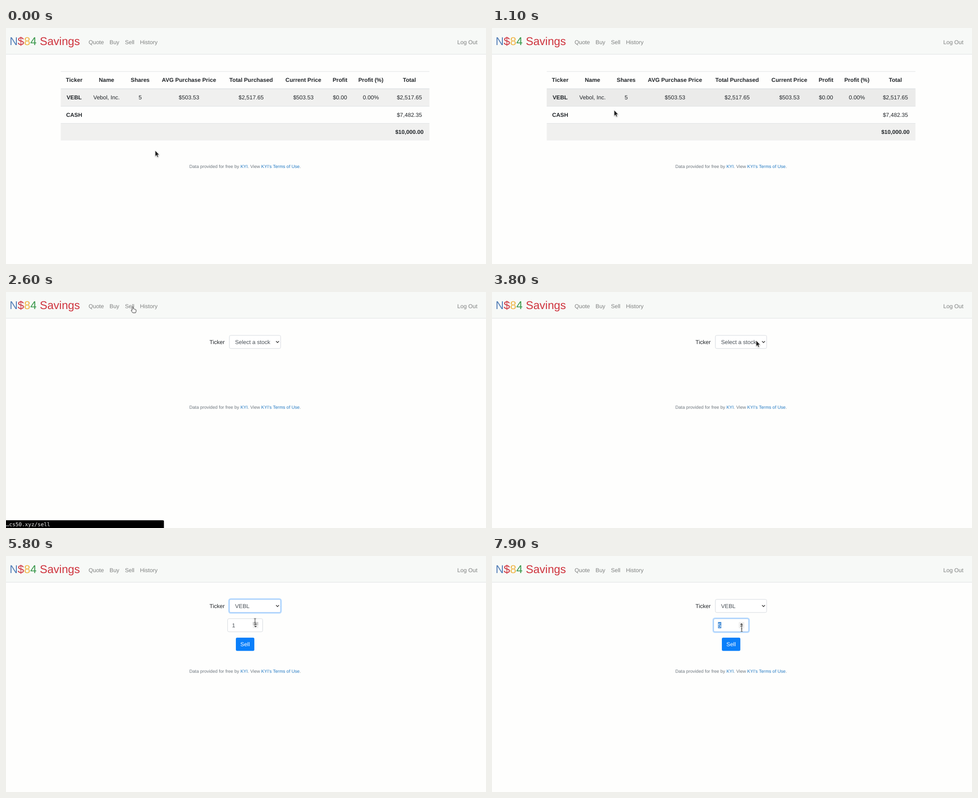
Write an HTML page that moves like this. It is 1065x526 px and loops after 8 s.

```html
<!DOCTYPE html>
<html lang="en">
<head>
<meta charset="utf-8">
<title>Portfolio</title>
<style>
html, body { margin: 0; width: 100%; height: 100%; overflow: hidden; background: #fefefd; }
svg { display: block; }
#stage { width: 1065px; height: 526px; }
text { font: 12.54px "Liberation Sans", Arial, sans-serif; fill: #212529; text-rendering: geometricPrecision; white-space: pre; }
.mid { text-anchor: middle; }
.bold, .bold text { font-weight: bold; }
.brand { font-size: 25.07px; fill: #cf343e; }
.nav text { fill: #7f8180; }
.foot { font-size: 10.05px; fill: #6c757d; }
.link { fill: #1f77c2; }
.field { fill: #fff; stroke: #ced4da; stroke-width: .9; }
.glow { fill: none; stroke: #bfdeff; stroke-width: 2.4; }
.edge { fill: none; stroke: #80bdff; stroke-width: .9; }
.value text, text.value { fill: #495057; }
.white { fill: #fff; }

/* Everything shares one 8 s clock with hard cuts. */
.a { animation: 8s step-end -10ms infinite; }
.home { animation-name: home; }
.form { animation-name: form; }
.row3 { animation-name: row3; }
.row2 { animation-name: row2; }
.row1 { animation-name: row1; }
.nav .sell { animation-name: sell; }
.status { animation-name: status; }
.foot { animation-name: foot; }
.before { animation-name: before; }
.order { animation-name: order; }
.popup { animation-name: popup; filter: drop-shadow(0 2px 3px rgba(0,0,0,.3)); }
.mark { animation-name: mark; }
.popup .opt1 { animation-name: opt1; }
.popup .opt2 { animation-name: opt2; }
.focus1 { animation-name: focus1; }
.focus2 { animation-name: focus2; }
.spin { animation-name: spin; }
.press { animation-name: press; }
.digits { animation-name: digits; }
.cursor { animation-name: move; }
.arrow { animation-name: arrow; }
.hand { animation-name: hand; }
.beam { animation-name: beam; }

@keyframes home { 0% { opacity: 1 } 32.5%, 100% { opacity: 0 } }
@keyframes form { 0% { opacity: 0 } 32.5%, 100% { opacity: 1 } }
@keyframes row3 { 0% { opacity: 0 } 11.25% { opacity: 1 } 12.5%, 100% { opacity: 0 } }
@keyframes row2 { 0% { opacity: 0 } 12.5% { opacity: 1 } 13.75%, 100% { opacity: 0 } }
@keyframes row1 { 0% { opacity: 0 } 13.75% { opacity: 1 } 15%, 100% { opacity: 0 } }
@keyframes sell { 0% { fill: #7f8180 } 20% { fill: #4b4c4b } 32.5%, 100% { fill: #7f8180 } }
@keyframes status { 0% { opacity: 0 } 21.25% { opacity: .6 } 23.75% { opacity: 1 } 35%, 100% { opacity: 0 } }
@keyframes foot { 0% { transform: none } 32.5%, 100% { transform: translateY(-51.8px) } }
@keyframes before { 0% { opacity: 1 } 66.25%, 100% { opacity: 0 } }
@keyframes order { 0% { opacity: 0 } 66.25%, 100% { opacity: 1 } }
@keyframes popup { 0% { opacity: 0 } 50% { opacity: 1 } 66.25%, 100% { opacity: 0 } }
@keyframes mark { 0% { transform: translateY(-15.7px) } 56.25%, 100% { transform: none } }
@keyframes opt1 { 0% { fill: #fff } 56.25%, 100% { fill: #495057 } }
@keyframes opt2 { 0% { fill: #495057 } 56.25%, 100% { fill: #fff } }
@keyframes focus1 { 0% { opacity: 0 } 48.75% { opacity: 1 } 75%, 100% { opacity: 0 } }
@keyframes focus2 { 0% { opacity: 0 } 75%, 100% { opacity: 1 } }
@keyframes spin { 0% { opacity: 0 } 72.5%, 100% { opacity: 1 } }
@keyframes press { 0% { opacity: 0 } 72.5% { opacity: 1 } 91.25%, 100% { opacity: 0 } }
@keyframes digits {
  0% { transform: none; fill: #495057 }
  75% { transform: translateY(-20px); fill: #fff }
  78.75% { transform: translateY(-40px); fill: #fff }
  85% { transform: translateY(-60px); fill: #fff }
  87.5%, 100% { transform: translateY(-80px); fill: #fff }
}
.digits text { fill: inherit; }
@keyframes arrow { 0% { opacity: 1 } 20% { opacity: 0 } 33.75% { opacity: 1 } 66.25%, 100% { opacity: 0 } }
@keyframes hand { 0% { opacity: 0 } 20% { opacity: 1 } 33.75%, 100% { opacity: 0 } }
@keyframes beam { 0% { opacity: 0 } 66.25%, 100% { opacity: 1 } }
@keyframes move {
  0% { transform: translate(331px, 273px) }
  10% { transform: translate(329px, 268px) }
  11.25% { transform: translate(316px, 245px) }
  12.5% { transform: translate(292px, 213px) }
  13.75% { transform: translate(271px, 183px) }
  15% { transform: translate(261px, 150px) }
  16.25% { transform: translate(262px, 115px) }
  17.5% { transform: translate(268px, 80px) }
  18.75% { transform: translate(275px, 50px) }
  20% { transform: translate(279px, 33px) }
  26.25% { transform: translate(281px, 33px) }
  33.75% { transform: translate(288px, 38px) }
  35% { transform: translate(310px, 47px) }
  36.25% { transform: translate(350px, 60px) }
  37.5% { transform: translate(400px, 76px) }
  38.75% { transform: translate(450px, 90px) }
  40% { transform: translate(495px, 101px) }
  41.25% { transform: translate(528px, 107px) }
  42.5% { transform: translate(552px, 110px) }
  43.75% { transform: translate(569px, 110px) }
  45% { transform: translate(579px, 109px) }
  46.25% { transform: translate(584px, 108px) }
  47.5% { transform: translate(586px, 108px) }
  53.75% { transform: translate(584px, 112px) }
  55% { transform: translate(580px, 121px) }
  56.25% { transform: translate(574px, 131px) }
  57.5% { transform: translate(567px, 139px) }
  58.75% { transform: translate(560px, 144px) }
  60% { transform: translate(555px, 146px) }
  61.25% { transform: translate(552.5px, 146.5px) }
  91.25% { transform: translate(534px, 145px) }
  92.5% { transform: translate(516px, 144px) }
  95% { transform: translate(511px, 149px) }
  96.25% { transform: translate(519px, 160px) }
  97.5% { transform: translate(538px, 164px) }
  98.75%, 100% { transform: translate(554px, 161px) }
}
</style>
</head>
<body>
<svg id="stage" viewBox="0 0 1065 526">
  <rect width="1065" height="526" fill="#fefefd"/>

  <g class="nav">
    <rect width="1065" height="58" fill="#f7f9f7"/>
    <rect y="58" width="1065" height="1" fill="#dfe2e3"/>
    <text class="brand" x="8" y="38.2" style="fill:#cf343e"><tspan fill="#5580b8">N</tspan>$<tspan fill="#efb546">8</tspan><tspan fill="#38974a">4</tspan> Savings</text>
    <text x="183.2" y="36">Quote</text>
    <text x="229.8" y="36">Buy</text>
    <text class="a sell" x="264" y="36">Sell</text>
    <text x="297.2" y="36">History</text>
    <text x="1001.3" y="36">Log Out</text>
  </g>

  <g class="a home">
    <g fill="#f0f0ef">
      <rect x="121.5" y="136" width="818" height="38.5"/>
      <rect x="121.5" y="212.5" width="818" height="38.2"/>
    </g>
    <g fill="#ebebea">
      <rect class="a row1" x="121.5" y="136" width="818" height="38.5"/>
      <rect class="a row2" x="121.5" y="174.5" width="818" height="38"/>
      <rect class="a row3" x="121.5" y="212.5" width="818" height="38.2"/>
    </g>
    <g fill="#dee1e3">
      <rect x="121.5" y="96.4" width="818" height="1"/>
      <rect x="121.5" y="134.7" width="818" height="1.6"/>
      <rect x="121.5" y="174" width="818" height="1"/>
      <rect x="121.5" y="212.2" width="818" height="1"/>
    </g>
    <text class="mid bold" y="120"><tspan x="151.2">Ticker</tspan><tspan x="223">Name</tspan><tspan x="297.7">Shares</tspan><tspan x="406">AVG Purchase Price</tspan><tspan x="543.8">Total Purchased</tspan><tspan x="659.8">Current Price</tspan><tspan x="741">Profit</tspan><tspan x="809.6">Profit (%)</tspan><tspan x="895">Total</tspan></text>
    <text class="mid" y="159.2"><tspan class="bold" x="151.2">VEBL</tspan><tspan x="223">Vebol, Inc.</tspan><tspan x="297.7">5</tspan><tspan x="406">$503.53</tspan><tspan x="543.8">$2,517.65</tspan><tspan x="659.8">$503.53</tspan><tspan x="741">$0.00</tspan><tspan x="809.6">0.00%</tspan><tspan x="895">$2,517.65</tspan></text>
    <text class="mid" y="197.6"><tspan class="bold" x="151.2">CASH</tspan><tspan x="895">$7,482.35</tspan></text>
    <text class="mid bold" x="895" y="236">$10,000.00</text>
  </g>

  <text class="a foot mid" x="530.5" y="312.4">Data provided for free by <tspan class="link">KYI</tspan>. View <tspan class="link">KYI’s Terms of Use</tspan>.</text>

  <g class="a form">
    <text x="451.6" y="115.6">Ticker</text>
    <rect class="field" x="495.6" y="96.7" width="113.8" height="29.2" rx="3"/>
    <g class="a focus1">
      <rect class="glow" x="494.3" y="95.4" width="116.4" height="31.8" rx="4"/>
      <rect class="edge" x="495.6" y="96.7" width="113.8" height="29.2" rx="3"/>
    </g>
    <text class="value" x="508.2" y="115.6"><tspan class="a before">Select a stock</tspan></text>
    <path d="M599.2 109.6l3.2 3.3 3.2-3.3" fill="none" stroke="#333" stroke-width="1.5"/>
  </g>

  <!-- The chosen ticker covers the placeholder. -->
  <g class="a order">
    <rect x="507" y="102" width="82" height="18" fill="#fff"/>
    <text class="value" x="508.2" y="115.6">VEBL</text>

    <rect class="field" x="491.7" y="139.7" width="77.8" height="29.2" rx="3"/>
    <g class="a focus2">
      <rect class="glow" x="490.4" y="138.4" width="80.4" height="31.8" rx="4"/>
      <rect class="edge" x="491.7" y="139.7" width="77.8" height="29.2" rx="3"/>
      <rect x="501.5" y="147.2" width="7.2" height="13.8" fill="#3c87d4"/>
    </g>
    <svg x="501.5" y="147" width="10" height="15" overflow="hidden">
      <g class="a digits">
        <text y="11.5">1</text>
        <text y="31.5">2</text>
        <text y="51.5">3</text>
        <text y="71.5">4</text>
        <text y="91.5">5</text>
      </g>
    </svg>
    <g class="a spin">
      <rect x="547.5" y="147.2" width="12.3" height="13.6" fill="#efefef"/>
      <rect class="a press" x="547.5" y="147.2" width="12.3" height="6.8" fill="#cfcfcf"/>
      <path d="M550.6 152.7l3-2.8 3 2.8zM550.6 156l3 2.8 3-2.8z" fill="#333"/>
    </g>

    <rect x="510" y="182" width="41" height="29.6" rx="3" fill="#0a7ffa"/>
    <text class="mid white" style="fill:#fff" x="530.5" y="201.2">Sell</text>
  </g>

  <g class="a popup">
    <rect x="495.6" y="126.5" width="113.4" height="32.8" fill="#fff" stroke="#555b60" stroke-width="1"/>
    <rect class="a mark" x="496.1" y="142.8" width="112.4" height="15.3" fill="#2492f4"/>
    <text class="a opt1" x="508.2" y="138.2">Select a stock</text>
    <text class="a opt2" x="508.2" y="153.9">VEBL</text>
  </g>

  <g class="a status">
    <path d="M0 508.7H348q2.4 0 2.4 2.4V526H0z" fill="#000"/>
    <text x="0" y="522" style="font:11.65px 'DejaVu Sans Mono',monospace;fill:#f2f2f2">…cs50.xyz/sell</text>
  </g>

  <g class="a cursor">
    <path class="a arrow" d="M0 0V13.2L3 10.5 5 15 7.2 14 5.2 9.7H9.2z" fill="#1c1c1c" stroke="#fff" stroke-width=".8" style="filter:drop-shadow(0 1px 1px rgba(0,0,0,.3))"/>
    <path class="a hand" d="M-1.3 8V1.2Q-1.3 0 0 0T1.2 1.2V4.6Q3 4 3.7 5.2 5.3 4.7 5.9 6 7.6 5.8 7.7 7.4V10.4L6.3 13.4H.3L-2.8 9.4Q-3.8 7.4-2.4 7.2z" fill="#f6f6f6" stroke="#2b2b2b" stroke-width="1"/>
    <g class="a beam" fill="none">
      <path d="M-2.6-7H2.6M0-7V7M-2.6 7H2.6" stroke="#fff" stroke-width="2.2"/>
      <path d="M-2.4-7H2.4M0-7V7M-2.4 7H2.4M-1.4 1.5H1.4" stroke="#2a2a2a" stroke-width="1.1"/>
    </g>
  </g>
</svg>
</body>
</html>
```
